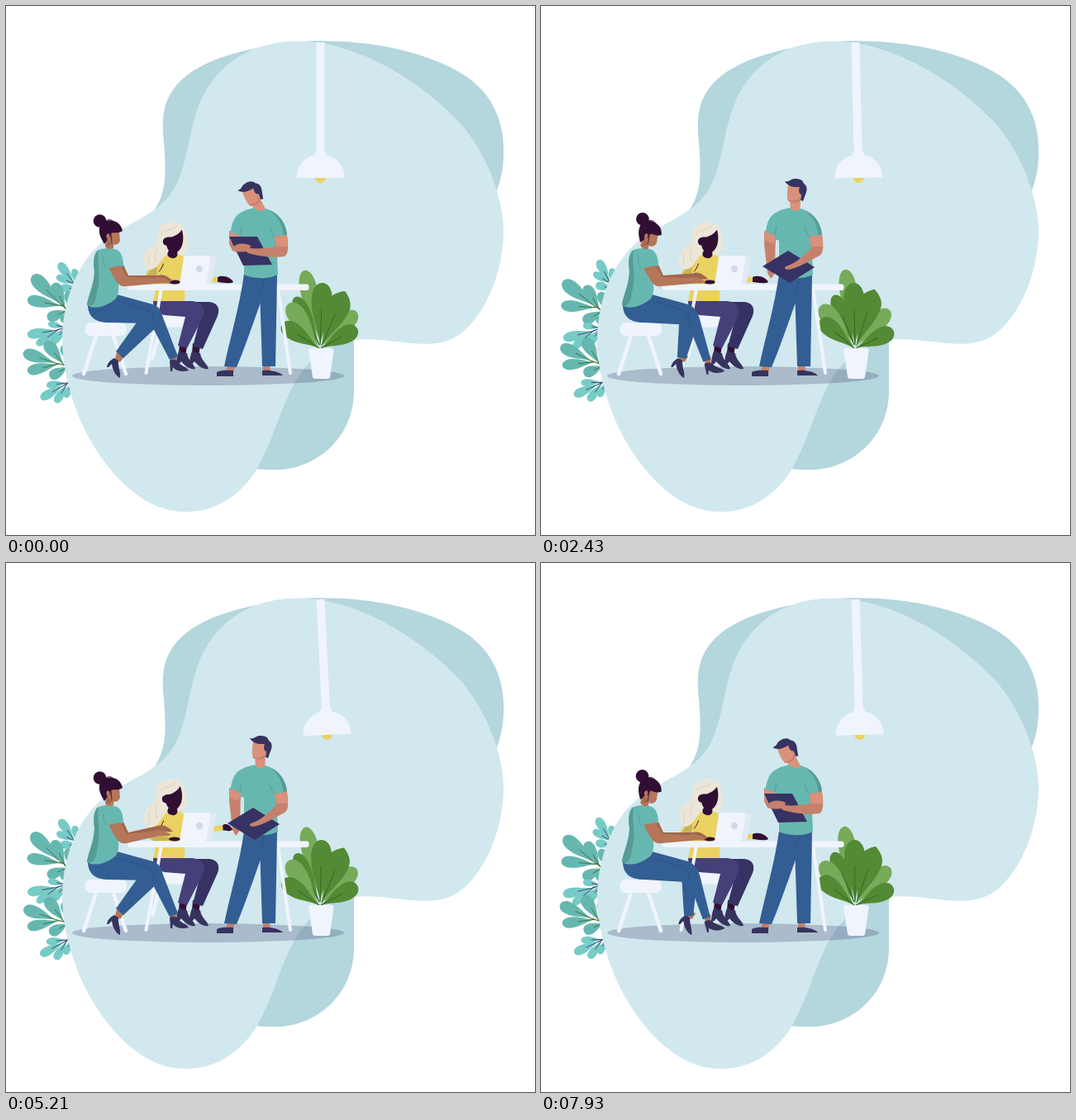
These frames come from a looping animation (640 by 640 pixels, 8000 ms). An HTML page with a canvas:

```html
<!DOCTYPE html>
<html lang="en">
<head>
<meta charset="utf-8">
<title>Team at a table</title>
<style>
html, body { margin: 0; width: 100%; height: 100%; overflow: hidden; background: #fff; }
canvas { display: block; width: 100%; height: 100%; }
</style>
</head>
<body>
<canvas id="stage"></canvas>
<script>
const canvas = document.getElementById('stage');
const ctx = canvas.getContext('2d');
const LOOP = 8000, SWAY = 6000;
const C = {
  pale: '#f0f4fd', back: '#b4d6dd', front: '#d1e8ee', shade: 'rgba(55,53,101,.25)',
  teal: '#67b7b1', tealDark: '#559b96', mint: '#76cbc6', blue: '#335e93', blueDark: '#2a4f80',
  navy: '#37335f', navyMid: '#363264', purple: '#453f7a', plum: '#310f34', yellow: '#ead262', olive: '#c9b357',
  cream: '#ece6d8', creamDark: '#dad2bf', brown: '#b5765a', brownDark: '#a1664c',
  skin: '#d9917b', skinDark: '#c5816c', leaf: '#538a35', leafLight: '#77aa59', vein: '#39691f'
};

// helpers
const rad = d => d * Math.PI / 180;
const lerp = (a, b, k) => a + (b - a) * k;

function key(t, stops) {
  for (let i = 1; i < stops.length; i++) {
    const [t0, a] = stops[i - 1], [t1, b] = stops[i];
    if (t <= t1) {
      const u = Math.max(0, (t - t0) / (t1 - t0));
      return lerp(a, b, u * u * (3 - 2 * u));
    }
  }
  return stops[stops.length - 1][1];
}

function morph(from, to, k) {
  const target = to.match(/-?[\d.]+/g);
  let i = 0;
  return from.replace(/-?[\d.]+/g, n => lerp(+n, +target[i++], k).toFixed(2));
}

function fill(d, color) {
  ctx.fillStyle = color;
  ctx.fill(new Path2D(d));
}

function line(d, color, width = 1) {
  ctx.strokeStyle = color;
  ctx.lineWidth = width;
  ctx.lineCap = 'round';
  ctx.stroke(new Path2D(d));
}

function oval(x, y, rx, ry, color) {
  ctx.fillStyle = color;
  ctx.beginPath();
  ctx.ellipse(x, y, rx, ry, 0, 0, 7);
  ctx.fill();
}

function bar(x, y, w, h, r, color) {
  ctx.fillStyle = color;
  ctx.beginPath();
  ctx.roundRect(x, y, w, h, r);
  ctx.fill();
}

function turned(x, y, deg, draw) {
  ctx.save();
  ctx.translate(x, y);
  ctx.rotate(rad(deg));
  ctx.translate(-x, -y);
  draw();
  ctx.restore();
}

function petal(x0, y0, x1, y1, w, color, vein, sharp) {
  const L = Math.hypot(x1 - x0, y1 - y0), h = w / 2, tip = sharp ? 0 : h * .55;
  ctx.save();
  ctx.translate(x0, y0);
  ctx.rotate(Math.atan2(y1 - y0, x1 - x0));
  ctx.beginPath();
  ctx.moveTo(0, 0);
  ctx.bezierCurveTo(L * .3, -h * .3, L * .45, -h, L * .74, -h);
  ctx.bezierCurveTo(L * .9, -h, L, -tip, L, 0);
  ctx.bezierCurveTo(L, tip, L * .9, h, L * .74, h);
  ctx.bezierCurveTo(L * .45, h, L * .3, h * .3, 0, 0);
  ctx.fillStyle = color;
  ctx.fill();
  if (vein) line(`M0 0L${L * .58} 0`, vein, 1);
  ctx.restore();
}

// foliage: base point, swing in degrees, colours, then lobes as x0 y0 x1 y1 width
const sprigs = [
  { base: [88, 341], swing: 10, color: C.mint, vein: C.navy, lobes: [
    [83, 336, 64, 311, 11], [85, 337, 61, 327, 9], [88, 341, 82, 318, 9], [88, 342, 66, 341, 10]] },
  { base: [82, 372], swing: -8, color: C.teal, vein: C.vein, lobes: [
    [66, 361, 32, 326, 17], [68, 363, 26, 355, 14], [72, 367, 58, 335, 14],
    [80, 371, 75, 345, 11], [76, 368, 50, 378, 13], [82, 372, 66, 381, 10]] },
  { base: [80, 387], swing: -5, color: C.mint, vein: C.navy, lobes: [
    [62, 392, 26, 398, 12], [64, 391, 37, 410, 10], [72, 389, 51, 384, 8], [74, 388, 55, 408, 11]] },
  { base: [82, 437], swing: 8, color: C.teal, vein: C.vein, lobes: [
    [60, 432, 21, 419, 15], [64, 433, 26, 442, 13], [70, 434, 48, 406, 15],
    [80, 436, 69, 410, 12], [76, 436, 53, 449, 13]] },
  { base: [82, 452], swing: 6, color: C.mint, vein: C.navy, lobes: [
    [70, 459, 42, 475, 11], [74, 457, 60, 480, 10], [74, 456, 49, 459, 9], [80, 454, 72, 474, 8]] }
];

const blades = [
  [381, 408, 361, 320, 21, 5, 0], [379, 410, 350, 352, 18, 5, 1], [378, 412, 342, 360, 22, -4, 0],
  [383, 410, 424, 370, 20, -4, 0], [380, 410, 383, 335, 25, -4, 1], [382, 411, 410, 345, 28, -6, 1, 1],
  [379, 414, 334, 385, 21, 8, 1], [381, 414, 425, 390, 21, 4, 1]
];

function bush(sway) {
  for (const s of sprigs) {
    turned(...s.base, s.swing * sway, () => {
      s.lobes.forEach(l => petal(...l, s.color));
      for (const [x, y, tx, ty] of s.lobes) {
        line(`M${x} ${y}L${lerp(x, tx, .5)} ${lerp(y, ty, .5)}`, s.vein, .8);
      }
      line(`M${s.base.join(' ')}L${s.lobes[0][0]} ${s.lobes[0][1]}`, s.vein, 1.1);
    });
  }
}

function plant(sway) {
  for (const [x0, y0, x1, y1, w, swing, dark, sharp] of blades) {
    turned(x0, y0, swing * sway, () =>
      petal(x0, y0, x1, y1, w, dark ? C.leaf : C.leafLight, dark ? C.vein : '', sharp));
  }
  fill('M366 416Q366 414 368 414L394 414Q397 414 396.5 417L392 449Q391.500 451 389 451L374 451Q371.500 451 371 449Z', C.pale);
}

function lamp(angle) {
  turned(380.5, 44, -angle, () => {
    oval(380.5, 207.5, 6.5, 6.5, C.yellow);
    ctx.fillStyle = C.pale;
    ctx.fillRect(375.5, 44, 10, 136);
    bar(373.5, 176.5, 14, 6, 1, C.pale);
    fill('M351.500 208C351.500 191 364 179.500 380.500 179.500C397 179.500 409.500 191 409.500 208Z', C.pale);
  });
}

function blonde(nod) {
  bar(172, 374.5, 46, 14, 6, C.pale);
  line('M188 386L177 426', C.pale, 4.5);
  for (const dx of [16, 0]) {
    ctx.save();
    ctx.translate(dx, 0);
    fill('M210 408L219 411L217 424L209 421Z', C.plum);
    fill('M210 416C213 420 217 420 219 420C220 429 228 433 229 439C222 440 216 435 212 430C210 433 208 434 206 434C206 428 207 421 210 416Z', C.navy);
    ctx.restore();
  }
  fill('M212 358L246 358C257 359 259 367 256 375L238 415L226 412L235 378L212 374Z', C.navyMid);
  fill('M178 357L226 357C238 359 242 366 239 375L219 414L208 411L217 376L192 374C183 372 178 366 178 357Z', C.purple);
  fill('M187 303C195 299 205 299 211 301C216 303 217 309 217 325L216 357L178 357C181 346 181 338 182 330L168 328C171 319 178 308 187 303Z', C.yellow);
  fill('M176 317L183 316L182 329L196 331L198 336L178 336L168 329Z', C.olive);
  line('M190.500 312C189 316 187 319 185.500 321', C.plum, 1);
  turned(202, 300, nod, () => {
    fill('M200 261C212 260 219 269 219 280C221 288 222 297 213 301L193 302C187 307 184 318 174 319C166 316 164 304 170 296C176 291 181 288 183 282C181 270 188 262 200 261Z', C.cream);
    fill('M213 271C216 282 214 293 207 298C209 303 204 306 201 305C195 304 194 300 197 296C194 292 193 286 194 280Z', C.plum);
    oval(194, 285, 4.2, 4.7, C.plum);
    fill('M184 285C189 276 197 282 204 278C210 275 212 273 213 268C206 261 188 261 184 276Z', C.cream);
    line('M187 277C190 268 202 274 207 265M181 291C186 294 177 300 182 309M173 300C170 306 175 309 172 315', C.creamDark, .9);
  });
}

function table() {
  line('M188 342L169.500 444M329 342L344 444', C.pale, 4);
  bar(147, 336.5, 219.5, 7.5, 3, C.pale);
}

function reach(t) {
  const at = (a, b, c, d) => key(t, [[400, a], [1000, b], [1400, b], [2100, a], [4400, a], [5050, c], [5400, c],
    [6300, d], [6700, d], [7300, a]]);
  const ex = 247, ey = at(331, 319, 322, 321);
  const wx = at(257, 267, 263, 265), wy = at(331, 303, 320.5, 316.5);
  const up = at(0, 1, 1, 1);
  line(`M${ex} ${ey}L${wx - 2} ${wy}`, C.yellow, 6.5);
  ctx.save();
  ctx.translate(wx, wy);
  ctx.rotate(Math.atan2(wy - ey, wx - ex));
  ctx.scale(lerp(1, .6, up), 1);
  fill('M-1 -3C5 -6 15 -3 18 3C12 6 4 3 -1 3Z', C.plum);
  ctx.restore();
}

function laptop() {
  oval(204, 334, 7, 2.6, C.plum);
  fill('M219 302L254 303L250 331Q249 336 245 336L211 336Z', '#e3e9f2');
  fill('M218 302L246 302Q248 302 247.500 304L243 333Q242.500 337 239 337L210 337L215 305Q215.500 302 218 302Z', C.pale);
  oval(234, 318, 4.2, 4.2, '#d2d9e8');
}

function woman(t) {
  const leg = key(t, [[600, 0], [1150, 1], [2430, .86], [3900, 1.07], [4850, 0], [6600, 0], [7150, .95], [7930, 1.08]]);
  const nod = key(t, [[600, 0], [1150, 15.5], [3000, 17], [4000, 12], [4800, 0], [6600, 0], [7200, 16]]);
  const near = key(t, [[500, 0], [1050, 7], [1400, 7], [2100, 0], [4500, 0], [5100, 5], [5400, 5], [6100, 0]]);
  const far = key(t, [[500, 0], [1050, 8], [1400, 8], [2100, 3], [3200, 1], [4500, 2], [5100, 8], [6600, 9], [7300, 0]]);

  line('M110 396L94 445M129 396L145 445', C.pale, 4.5);
  bar(95.5, 383, 50.5, 16, 7, C.pale);

  // tucked leg
  ctx.save();
  ctx.translate(41 * leg, 0);
  fill('M134 419L143 424L138 431L132 427Z', C.brown);
  fill('M131 426C127 428 123 431 122 437L124 437L128 433C129 441 133 448 138 450C139 442 135 436 136 429Z', C.navy);
  ctx.restore();
  fill(morph('M158 383L176 364L188 383L142 426L133 418Z', 'M169 376L178 364L188 390L181 427L170 426Z', leg), C.blue);

  // front leg
  turned(203, 430, -10 * leg, () => {
    ctx.save();
    ctx.translate(-1 * leg, 4 * leg);
    fill('M199 422L207 421L206 431L199 431Z', C.brown);
    fill('M198 429C201 427 205 428 207 429C210 435 218 436 221 441C214 443 206 442 202 437L201 442L199 442Z', C.navy);
    ctx.restore();
  });
  fill(morph(
    'M99 361C108 366 128 362 134 349L178 361C186 364 188 370 190 377L208 424L198 428L175 384L125 383C108 383 99 376 99 361Z',
    'M99 361C108 366 128 362 134 349L178 361C185 363 190 371 192 378L205 428L196 431L179 386L125 383C108 383 99 376 99 361Z',
    leg), C.blue);
  line('M136 357C150 362 164 365 173 369C177 371 179 377 180 384', C.blueDark, .8);

  // arms and torso
  fill(`M133 312L142 313L148 326L184 ${326 - far}C190 ${323 - far} 199 ${329 - far} 202 ${333 - far}C194 ${334 - far} 188 ${332 - far} 182 ${332 - far}L145 333Z`, C.brownDark);
  fill('M110 296C117 292 130 292 136 296C141 301 142 308 142 314L131 319C136 331 139 344 133 354C120 365 106 367 98 362C99 351 107 338 107 320C105 309 106 301 110 296Z', C.teal);
  fill('M112 295C105 303 106 311 107 322C106 339 99 351 98 362C106 365 109 357 110 346C116 329 109 311 112 295Z', C.tealDark);
  line('M118 304C117 309 119 314 121 317', C.tealDark, 1);
  fill(`M124 317L138 314C142 319 144 325 147 328L180 ${329 - near}C186 ${326 - near} 195 ${331 - near} 200 ${334 - near}C194 ${336 - near} 188 ${334 - near} 181 ${336 - near}L146 339C139 340 136 337 132 331Z`, C.brown);

  turned(126, 291, nod, () => {
    fill('M121 277L131 282L130 293C126 295 121 294 120 291Z', C.brown);
    fill('M125 272L136 271C138 275 137 279 138 282C138 288 133 290 129 288L123 283Z', C.brown);
    fill('M129 288C126 287 124 285 123 283L122 292Z', C.brownDark);
    fill('M113 269C114 259 127 256 136 263C139 266 140 268 141 272C135 276 130 273 127 275L126 281C124 278 123 280 122 284L119 288C115 281 112 276 113 269Z', C.plum);
    oval(123.5, 278.5, 2.1, 3.1, C.brown);
    oval(113.5, 260, 7.8, 7.8, C.plum);
    line('M119 261C124 257 128 258 130 261M127 275L128 287', C.plum, .8);
  });
}

function man(t) {
  const up = key(t, [[350, 0], [1000, 1], [6800, 1], [7450, 0]]);

  fill('M268 433L277 435L275 444L266 444ZM311 433L319 433L320 443L311 443Z', C.skinDark);
  fill('M255 443C261 440 268 441 275 441L275 448L255 448Z', C.navy);
  fill('M310 441C319 440 330 442 335 447L310 447Z', C.navy);
  fill('M288 324L320 326C306 362 293 404 279 437L264 436C271 402 283 362 288 324Z', C.blue);
  fill('M305 325L328 325L326 436L310 436L307 344Z', C.blue);
  line('M307 347C310 341 311 336 312 331', C.blueDark, .8);

  turned(309, 246, -29 * (1 - up), () => {
    fill('M301 232L314 230L313.500 248L302 249Z', C.skin);
    fill('M299 216C298 224 297 231 299 236C305 239 312 236 315 230L315 217Z', C.skin);
    fill('M299 234C305 237 311 235 314 231L313 236C308 239 303 238 300 236Z', C.skinDark);
    fill('M295 212C299 213 301 211 304 209.500C311 208 317 210 318 215C322 217 322 222 321 225L317 236L314 235L315 228C311 227 312 221 313 219C306 219 299 219 295 212Z', C.navy);
  });

  fill(morph('M270 272L285 278C284 286 284 289 288 292L286 296L282 299L274 296L270 288Z',
    'M270 272L285 278C282 292 285 304 282 314L282 325L278 330L274 323L270 288Z', up), C.skinDark);
  fill('M284 250C290 246 298 245 301 244C304 249 311 249 314 245C331 250 338 262 340 278L327 281L329 325C318 331 298 330 288 325L288 284L271 277C273 263 276 254 284 250Z', C.teal);
  fill('M318 247C332 252 339 265 340 276L336 278C334 261 327 253 318 247Z', C.tealDark);
  line('M285 267C283 272 284 277 282 281M319 268C321 273 322 277 325 280', C.tealDark, 1);
  fill('M271 273L284 278L282 288L270 284Z', C.skin);
  fill(morph('M270 279L304 279L322 313L287 314Z', 'M299 296L331 316L301 335L268 315Z', up), C.navyMid);

  ctx.globalAlpha = Math.max(0, 1 - up * 2);
  fill('M275 291C281 286 291 287 296 290L294 296C288 298 281 298 275 296Z', C.skinDark);
  ctx.globalAlpha = 1;
  fill(morph(
    'M325 279L340 277C342 290 342 300 337 303C325 305 306 303 293 299C289 297 291 293 295 293C304 294 316 293 326 291Z',
    'M325 279L340 277C342 290 342 299 337 302C325 308 310 318 298 319C293 318 295 315 299 314C308 311 318 302 327 293Z',
    up), C.skinDark);
  fill('M325 279L340 277L341 291L327 291Z', C.skin);
}

function draw(t) {
  const sway = (1 - Math.cos(2 * Math.PI * t / SWAY)) / 2;
  const swing = t < 5500 ? t / 5500 * 2.95 : 2.95 - (t - 5500) / 2500 * 1.15;

  ctx.fillStyle = '#fff';
  ctx.fillRect(0, 0, 640, 640);
  fill('M180 246C196 222 193 195 191 165C188 135 190 115 207 95C236 62 300 48 365 42.500C430 40 505 52 555 84C590 107 603 142 602 178C602 198 598 213 592 228C560 320 420 340 421 405L421 465C421 525 372 563 322 561C314 561 308 561 300 559Z', C.back);
  bush(sway);
  fill('M180 246C216 222 216 180 227 140C243 76 290 43 352 42.500C430 43 505 95 549 141C582 178 603 235 602 276C600 330 576 380 545 400C525 411 505 409 490 408C462 405 440 402 420 404C385 410 362 432 348 458C331 490 325 522 302 563C280 596 250 612 218 612C165 612 125 566 100 522C80 484 68 440 68 403C69 350 90 300 130 276C147 265 165 257 180 246Z', C.front);
  oval(244.5, 447.5, 164.5, 11.5, C.shade);
  lamp(swing);
  plant(sway);
  blonde(key(t, [[400, 0], [1050, 9], [1400, 9], [2200, 0], [4300, 0], [5100, -4], [6600, -4], [7400, 0]]));
  table();
  reach(t);
  laptop();
  woman(t);
  man(t);
}

function resize() {
  const dpr = window.devicePixelRatio || 1;
  canvas.width = Math.round(innerWidth * dpr);
  canvas.height = Math.round(innerHeight * dpr);
}
addEventListener('resize', resize);
resize();

const start = performance.now();
function tick() {
  ctx.setTransform(canvas.width / 640, 0, 0, canvas.height / 640, 0, 0);
  draw((performance.now() - start) % LOOP);
  requestAnimationFrame(tick);
}
tick();
</script>
</body>
</html>
```
